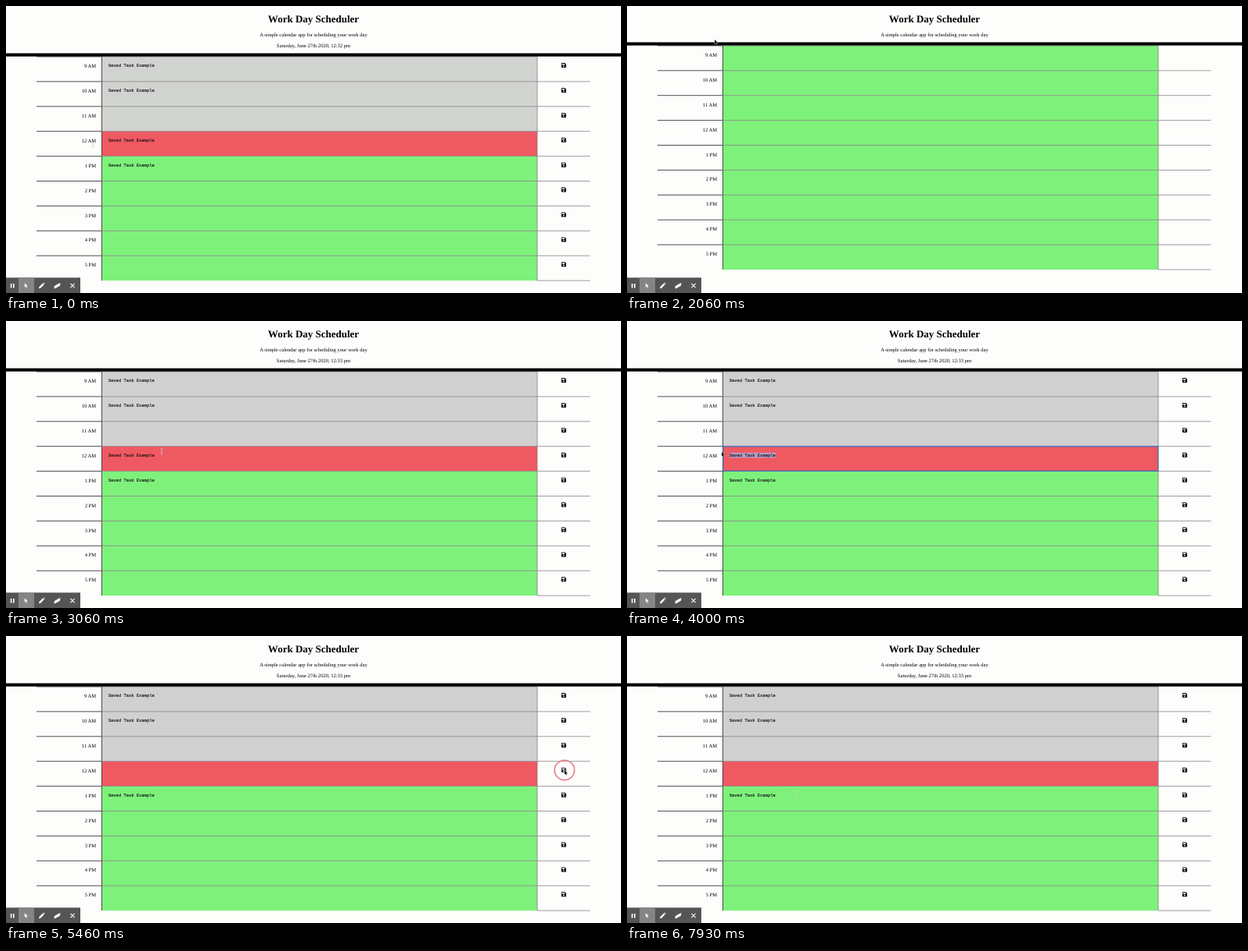
Recreate the animation shown at these times as an HTML page. Size 786x368 px, loop 8000 ms.

```html
<!DOCTYPE html>
<html lang="en">
<head>
<meta charset="utf-8">
<title>Day planner</title>
<style>
  html, body { margin: 0; width: 100%; height: 100%; overflow: hidden; background: #fdfdfc; }
  svg { display: block; width: 786px; height: 368px; }
  text { font: 6.55px "Liberation Serif", "Times New Roman", serif; text-rendering: geometricPrecision; white-space: pre; }
  .mid { text-anchor: middle; }
  .title { font-size: 13px; font-weight: bold; }
  .hour { text-anchor: end; }
  .task { font: 5.46px "Liberation Mono", "Courier New", monospace; fill: #141414; stroke: #141414; stroke-width: .15; }
  .dark, .soft { fill: none; stroke-width: .8; }
  .dark { stroke: #222; }
  .soft { stroke: #858585; }
</style>
</head>
<body>
<svg viewBox="0 0 786 368">
  <defs>
    <g id="save">
      <path d="M-2.4-3H1.5L3-1.5V2.4Q3 3 2.4 3H-2.4Q-3 3-3 2.4V-2.4Q-3-3-2.4-3Z"/>
      <path d="M-2.2-2.1H1.3V-.5H-2.2Z" fill="#fdfdfc"/>
      <circle cy="1.2" r=".9" fill="#fdfdfc"/>
    </g>
    <path id="pointer" d="M0 0V5.6L1.3 4.4L2.2 6.4L3.2 6L2.3 4H4Z"/>
  </defs>

  <text class="mid title" x="393" y="20.7">Work Day Scheduler</text>
  <text class="mid" x="393" y="38.7">A simple calendar app for scheduling your work day</text>
  <text class="mid" x="393" y="52.6" id="date"></text>

  <g id="page">
    <g id="rows"></g>
    <rect y="60.6" width="786" height="4.1"/>
    <rect id="focus" x="122.8" y="160.9" width="556" height="31.4" fill="none" stroke="#2f6fc4" stroke-width="1.1"/>
  </g>

  <g id="toolbar">
    <rect y="348.3" width="95" height="19.7" fill="#555"/>
    <rect x="16" y="348.3" width="20" height="19.7" fill="#858585"/>
    <g fill="#fff">
      <path d="M5.8 356h1.6v5.6H5.8ZM9 356h1.6v5.6H9Z"/>
      <use href="#pointer" x="23.8" y="355.2"/>
      <path d="M42 362.2l.5-2.2 4.4-4.4 1.7 1.7-4.4 4.4ZM47.4 355.1l.7-.7 1.7 1.7-.7.7Z"/>
      <path d="M61.6 359.2l4.6-2.6 3.3-1.5-.6 3.6-4.4 2.5-2.9 1.2Z"/>
      <path d="M82.4 355.9l5.2 5.2m0-5.2l-5.2 5.2" stroke="#fff" stroke-width="1.1"/>
    </g>
  </g>

  <circle id="ring" r="12.7" fill="#fff" fill-opacity=".12" stroke="#e57f8a" stroke-width="1.7"/>
  <use id="arrow" href="#pointer" fill="#111" stroke="#fff" stroke-width=".7" paint-order="stroke"/>
  <path id="beam" d="M-1.6-3.3Q0-3.3 0-2.5Q0-3.3 1.6-3.3M0-2.5V2.5M-1.6 3.3Q0 3.3 0 2.5Q0 3.3 1.6 3.3" fill="none" stroke="#ccc" stroke-width=".8"/>
</svg>
<script>
const LOOP = 8000, TOP = 65, PITCH = 31.9, NOW = 3;
const GREEN = '#7ef17b', RED = '#ef5962';
const hours = ['9 AM', '10 AM', '11 AM', '12 AM', '1 PM', '2 PM', '3 PM', '4 PM', '5 PM'];
const $ = id => document.getElementById(id);

// Cursor stops: time, x, y
const stops = [
  [0, 111, 178], [260, 56, 100], [660, 95, 36], [800, 95, 36], [1060, 89, 32],
  [1260, 112, 43], [2270, 112, 43], [3060, 199, 167], [3200, 199, 169],
  [3400, 191, 172], [3860, 121, 168], [4070, 121, 168], [4700, 778, 176],
  [5000, 769, 175], [5330, 714, 172], [5800, 713, 172], [6660, 420, 182],
  [7530, 230, 208], [7930, 215, 202], [LOOP, 215, 202]
];

$('rows').innerHTML = hours.map((hour, i) => {
  const y = TOP + i * PITCH, base = y + 13.9, end = y + PITCH;
  const task = i < 5 && i !== 2;
  return `<rect class="slot" x="122.5" y="${y}" width="556.5" height="${PITCH}"/>
    <path class="dark" d="M39 ${y}H122.5V${end}"/>
    <path class="soft" d="M122.5 ${y}H679V${end}H746.5"/>
    <text class="hour" x="115" y="${base + .2}">${hour}</text>
    ${i === NOW ? `<rect id="marked" y="${y + 8.2}" height="6.4" fill="#b3a0c6"/>` : ''}
    ${task ? `<text class="task loaded" x="130.8" y="${base - .8}"${i === NOW ? ' id="edited"' : ''}>Saved Task Example</text>` : ''}
    <use class="loaded" href="#save" x="712.8" y="${y + 11.1}"/>`;
}).join('');

const slots = [...document.querySelectorAll('.slot')];
const loaded = [...document.querySelectorAll('.loaded')];
const show = (el, on) => el.setAttribute('visibility', on ? 'visible' : 'hidden');
const move = (el, x, y) => el.setAttribute('transform', `translate(${x} ${y})`);
const within = (t, a, b) => t >= a && t < b;

function cursorAt(t) {
  const i = Math.max(1, stops.findIndex(s => s[0] > t));
  const [t0, x0, y0] = stops[i - 1], [t1, x1, y1] = stops[i];
  const k = (t - t0) / (t1 - t0), e = k * k * (3 - 2 * k);
  return [x0 + (x1 - x0) * e, y0 + (y1 - y0) * e];
}

function draw(time) {
  const t = Math.floor((time % LOOP + 6.7) * .015) / .015 % LOOP;
  const blank = within(t, 2055, 2125), reloaded = t >= 2125;
  const [x, y] = cursorAt(t);
  const inField = x > 122.5 && x < 679 && y > TOP;
  const typing = inField || t < 60;

  move($('page'), 0, blank ? -14.1 : 0);
  $('date').textContent = blank ? '' : `Saturday, June 27th 2020, 12:${reloaded ? 33 : 32} pm`;
  slots.forEach((slot, i) => {
    const past = reloaded ? '#d0d0d0' : '#d1d3d0';
    slot.setAttribute('fill', blank || i > NOW ? GREEN : i < NOW ? past : RED);
  });
  loaded.forEach(el => show(el, !blank));
  if (t >= 4130) show($('edited'), false);

  const left = Math.max(130.8, Math.min(190, x));
  show($('marked'), within(t, 3400, 4130));
  $('marked').setAttribute('x', left);
  $('marked').setAttribute('width', 190 - left);
  show($('focus'), within(t, 3330, 5390));

  show($('ring'), within(t, 3330, 3920) || within(t, 5390, 5600));
  move($('ring'), x, y);
  show($('beam'), typing);
  move($('beam'), x, y);
  show($('arrow'), !typing);
  move($('arrow'), x, y);
}

const start = performance.now();
function tick() {
  draw(performance.now() - start);
  requestAnimationFrame(tick);
}
tick();
</script>
</body>
</html>
```
